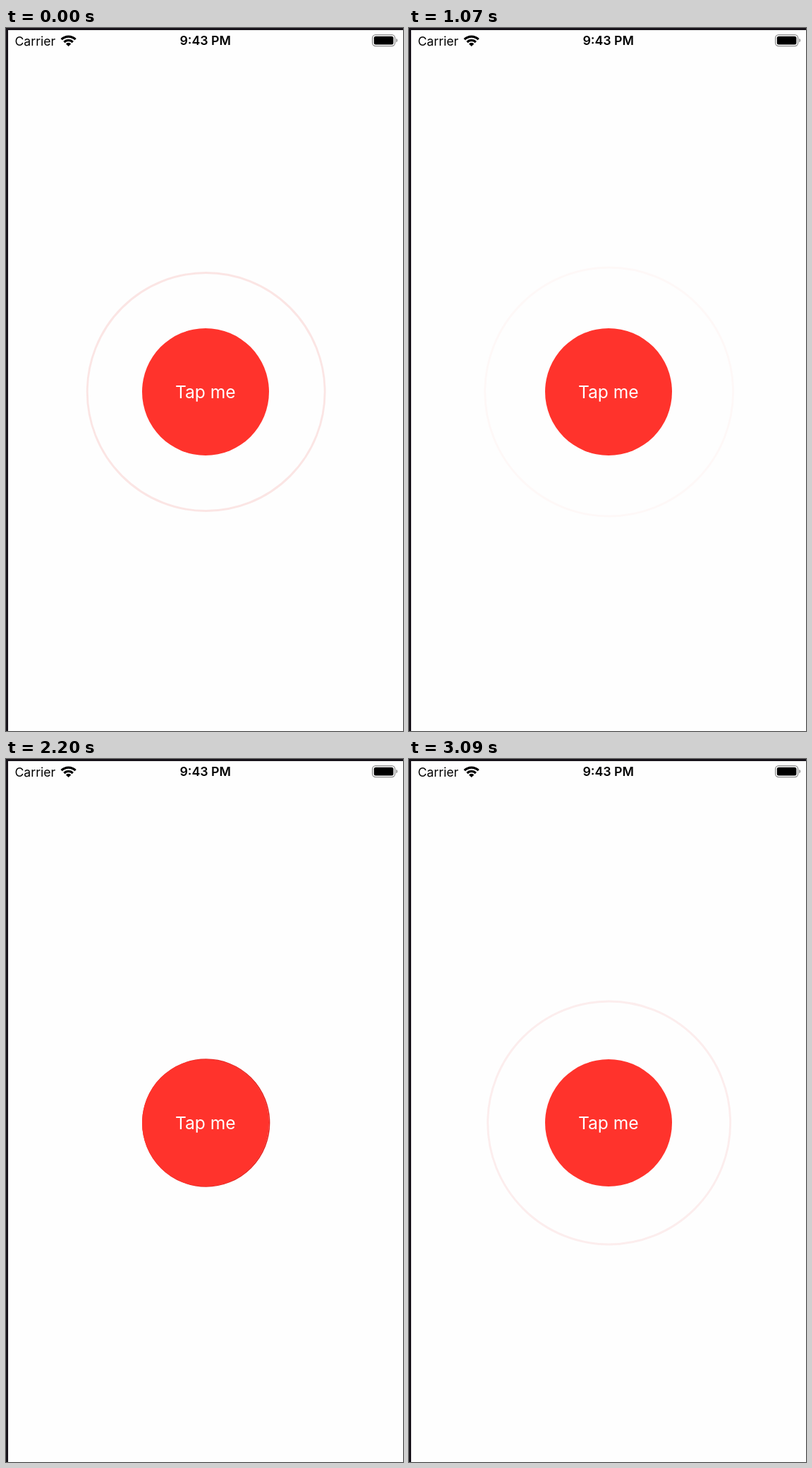
Recreate the animation shown at these times as an HTML page. Size 563 by 995 pixels, loop 3.12 s.

```html
<!DOCTYPE html>
<html>
<head>
<meta charset="utf-8">
<style>
  html, body { margin: 0; width: 100%; height: 100%; overflow: hidden; background: #fefefe; }
  svg { display: block; width: 563px; height: 995px; }
  text { font-family: Inter, "Liberation Sans", sans-serif; }
</style>
</head>
<body>
<svg viewBox="0 0 563 995">
  <path d="M0 0H563V3H3V995H0Z" fill="#17131a"/>

  <text x="12.5" y="24.6" font-size="17.6">Carrier</text>
  <g fill="none" stroke="#000" stroke-width="3.2">
    <path d="M78.6 16.2A14.2 14.2 0 0 1 98.6 16.2"/>
    <path d="M82.4 20A8.8 8.8 0 0 1 94.8 20"/>
  </g>
  <path d="M88.6 26L84.9 22.4A5.2 5.2 0 0 1 92.3 22.4Z"/>
  <text x="282.7" y="24.4" font-size="17.8" font-weight="600" text-anchor="middle">9:43 PM</text>
  <rect x="519.6" y="9.6" width="32" height="16" rx="4.5" fill="none" stroke="#8f8f8f" stroke-width="1.3"/>
  <rect x="521.8" y="11.8" width="27.6" height="11.6" rx="2.5"/>
  <path d="M553.3 14.8Q555.2 15.6 555.2 17.6T553.3 20.4Z" fill="#8f8f8f"/>

  <circle id="ring" cx="283.7" cy="515" fill="none" stroke="#e2231f"/>
  <circle cx="283" cy="515" r="90" fill="#ff332c"/>
  <text x="282.8" y="523.6" font-size="24.6" fill="#fff" text-anchor="middle">Tap me</text>
</svg>
<script>
  const LOOP = 3120, PULSE = 1000;
  const starts = [-930, 88, 1135, 2135];
  const ring = document.getElementById('ring');

  // cubic-bezier(.42, 0, 1, 1), solved by bisection
  function easeIn(x) {
    let lo = 0, hi = 1;
    for (let i = 0; i < 24; i++) {
      const s = (lo + hi) / 2, q = 1 - s;
      if (1.26 * q * q * s + 3 * q * s * s + s ** 3 < x) lo = s;
      else hi = s;
    }
    return 3 * (1 - lo) * lo * lo + lo ** 3;
  }

  function draw(now) {
    const t = now % LOOP;
    const start = starts.filter(s => s <= t).pop();
    const p = easeIn(Math.min(1, (t - start) / PULSE));
    const width = 1.5 * (1 + p);
    ring.setAttribute('r', 90 * (1 + p) - width / 2);
    ring.setAttribute('stroke-width', width);
    ring.setAttribute('opacity', 1 - p);
  }

  const begin = performance.now();
  function tick() {
    draw(performance.now() - begin);
    requestAnimationFrame(tick);
  }
  tick();
</script>
</body>
</html>
```
